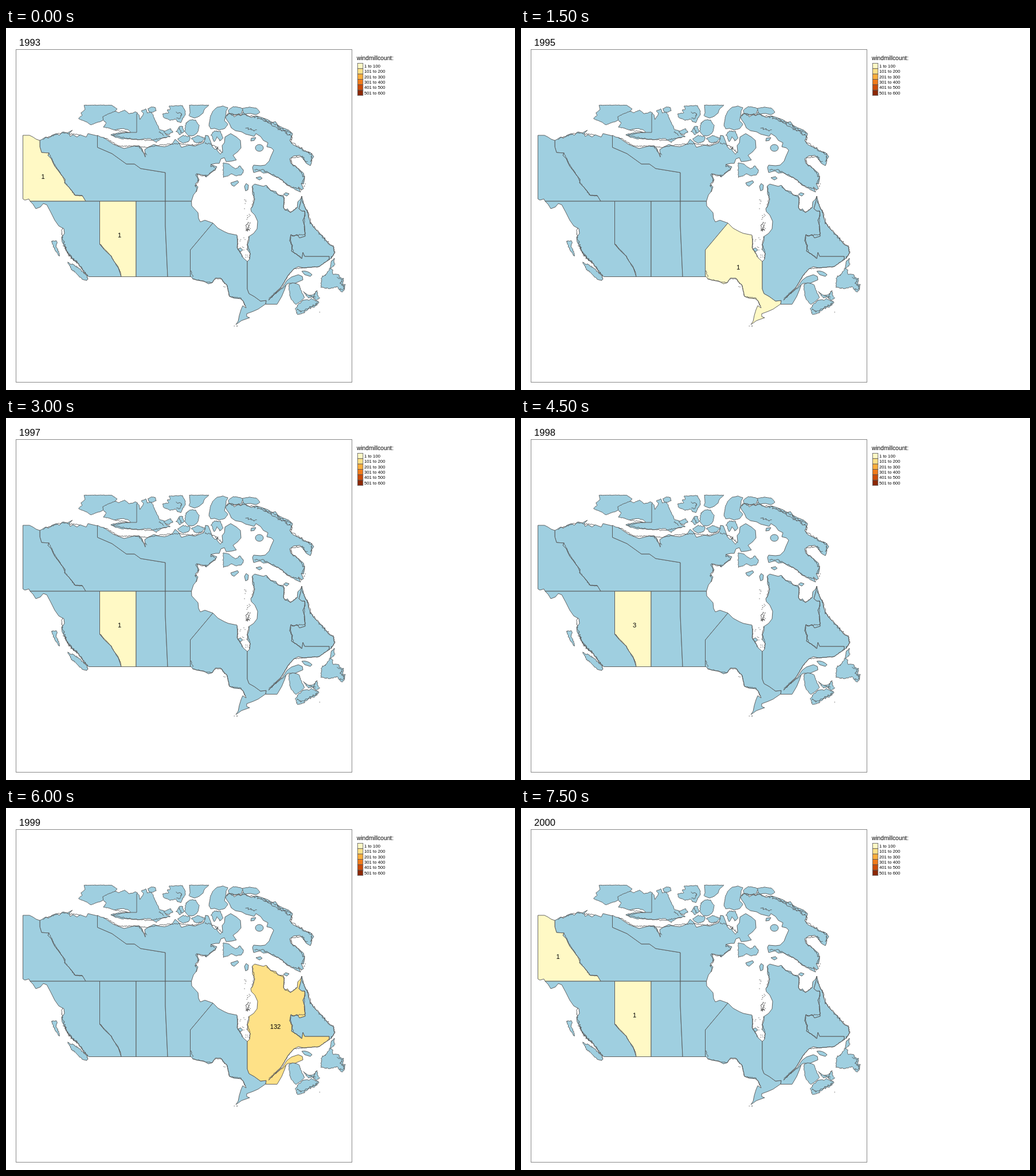
Animation of 888 by 631 pixels, one loop 8000 ms. Source, as an HTML page:

```html
<!DOCTYPE html>
<html lang="en">
<head>
<meta charset="utf-8">
<title>Windmill count by year</title>
<style>
  html, body { margin: 0; width: 100%; height: 100%; overflow: hidden; background: #fff; }
  svg { display: block; width: 888px; height: 631px; font-family: "Liberation Sans", Arial, sans-serif; }
  .land { fill: #9fcfe0; stroke: #555; stroke-width: .9; stroke-linejoin: round; }
  .coast { fill: none; stroke: #555; stroke-width: .9; }
  #labels { font-size: 11.2px; text-anchor: middle; }
</style>
</head>
<body>
<svg viewBox="0 0 888 631">
  <rect x="17.5" y="37.5" width="586" height="580" fill="none" stroke="#888"/>
  <text id="year" x="23" y="31" font-size="16.6"></text>
  <text x="612" y="55.5" font-size="10.2">windmillcount:</text>
  <g id="legend" font-size="7.75"></g>

  <g class="land">
    <!-- Mainland -->
    <path d="M59 196L63 194 69 190 74 192 80 187 88 184 93 187 99 181 107 183 116 178 110 184 112 189 117 186 124 190 129 186 140 190 143 184 159.5 188V208L185 219 210 237 224 237 235 245 278 252V302H139L133 292 121 292 116 285 109 277 102 270 103 264 97 257 92 250 85 241 82 235 79 228 73 222 75 218 62 217 59 207Z"/>
    <path d="M159.5 187L165 190 171 191 179 197 188 203 198 207 206 210 214 208 222 206 232 205 237 210 243 225 242 212 248 208 258 203 267 206 277 207 283 205 290 202 295 194 301 199 306 208 313 206 320 204 329 206 337 203 345 200 347 194 348 187 353 188 357 198 360 207 365 212 370 207 368 213 374 220 378 215 377 205 381 200 382 190 392 184 402 190 409 196 410 209 404 216 396 222 402 230 394 232 384 233 381 226 375 228 372 236 366 236 357 238 368 242 364 248 358 252 349 260 346 257 333 254 335 261 337 265 330 272 335 277 331 286 327 291 323.500 302H278V252L235 245 224 237 210 237 185 219 159.500 208Z"/>
    <path id="northwest" d="M29.500 187L41 187 47 190 53 194 59 196V207L62 217 75 218 73 222 79 228 82 235 85 241 92 250 97 257 103 264 102 270 109 277 116 285 121 292 133 292 139 302H42L40 298 33 300 29.500 298Z"/>
    <path d="M42 302H163.500V377L172 387 183 397 195 415 201 433.500H145L142 432 133 421 125 409 117 404 108 393 104 384 98 373 97 365 102 358 101 350 92 345 85 335 78 321 71 308 65 306 60 312 52 315 47 307Z"/>
    <path id="foothills" d="M163.500 302H227V433.500H201L200 427 195 415 188 406 183 397 172 387 166 378 163.500 377Z"/>
    <path d="M227 302H278V345L282 433.500H227Z"/>
    <path d="M278 302H323.500L324 310 335 322 336 332 339 338 347 335 361 340 321.500 387V433.500H282L278 345Z"/>
    <path id="lakes" d="M361 340L370 349 381 355 388 358 403 361 404 374 403 383 409 391 414 401 421 407V455L424 463 433 468 444 476 454 475 453 481 440 490 431 494 420 498 420 503 425 505 411 510 401 517 405 511 407 501 410 491 413 484 419 488 414 476 409 472 398 471 390 468 387 455 385 447 379 443 375 436 365 436 360 444 353 446 345 441 335 440 326 437 323 433.500H321.500V387Z"/>
    <path id="east" d="M421 407L425 403 426 393 422 388 421 378 424 370 423 364 432 358 438 350 439 337 434 326 428 320 427 315 431 309 434 298 430 289 430 275 434 272 449 276 454 274 462 283 471 285 474 291 484 292 485 300 484 313 487 318 491 315 496 322 503 317 508 313 509 303 514 298 516 293 515 301 511 315 516 319 521 319 522 327 518 335 521 345 522 363 512 366 508 360 502 363 497 360 495 371 500 379 498 389 505 393 516 402 518 391 521 398H564V404L556 409 546 416 533 417 519 418 510 416 502 420 492 431 482 449 470 462 458 474 473 460 483 451 490 440 498 434 510 430 517 433 518 439 504 445 493 445 489 447 486 456 481 468 473 481.500H453L454 475 444 476 433 468 424 463 421 455Z"/>
    <path d="M516 293L518 301 521 312 526 319 528 331 532 340 538 349 545 356 552 362 559 371 563 377 571 381 573 391 570 398 564 404V398H521L518 391 516 402 505 393 498 389 500 379 495 371 497 360 502 363 508 360 512 366 522 363 521 345 518 335 522 327 521 319 516 319 511 315 515 301Z"/>
    <path data-rough=".5" d="M494 447L500 444 511 447 513 453 517 463 521 470 514 476 506 482 500 476 496 470 494 456Z"/>

    <!-- Atlantic islands -->
    <path data-rough="1.1" d="M505 490L512 479 519 474 526 474 534 472 538 475 547 478 536 487 527 490 517 498 509 500Z"/>
    <path data-rough=".9" d="M536 470L540 459 543 458 543 466 547 471 541 475Z"/>
    <path data-rough=".6" d="M519 460L527 466 536 465 539 462 536 469 527 470Z"/>
    <path data-rough="1" d="M573 402L567 409 564 422 558 431 551 433 550 444 549 452 560 454 570 453 578 451 581 456 587 461 591 456 592 446 586 448 589 437 581 434 581 430 570 429 570 421 566 420 573 412Z"/>
    <path d="M516 424Q526 422 534 430L531 433 521 430Z"/>

    <!-- Pacific islands -->
    <path data-rough="1.1" d="M108 409L118 413 130 421 139 430 143 437 141 441 132 437 122 427 113 419Z"/>
    <path data-rough=".8" d="M80 372L88 370 90 374 87 380 91 387 94 398 87 390 82 379Z"/>

    <!-- Arctic islands -->
    <path data-rough=".3" d="M136 134.500H184L194 141 186 150 176 154 168 162 158 165 148 169 141 164 126 158 133 152 131 148 138 142Z"/>
    <path data-rough=".6" d="M169 155L177 150 190 145 196 148 206 143 214 149 222 148 226 146 232 151 234 159 240 150 236 144 244 141 247 148 252 146 256 151 259 158 262 165 268 177 277 180 279 186 287 189 272 192 262 199 252 193 240 193 234 195 214 193 202 193 190 190 183 186 196 183 218 182 214 178 205 175 189 178 178 174 170 173 175 165 169 160Z"/>
    <path data-rough=".5" d="M248 141L253 138 260 138 262 144 255 147 249 146Z"/>
    <path data-rough=".6" d="M284 136L308 135 309 139 313 144 313 150 308 158 305 165 299 163 296 159 287 161 275 156 274 149 284 148 281 143 287 142Z"/>
    <path data-rough=".3" d="M320 134.500H354L346 142 344 148 337 154 329 157 319 153 321 148Z"/>
    <path data-rough=".6" d="M314 166L321 160 331 161 337 170 335 181 329 187 318 188 312 181Z"/>
    <path data-rough=".8" d="M300 194L309 187 322 190 318 199 307 201Z"/>
    <path data-rough=".8" d="M275 181L286 175 291 181 283 186Z"/>
    <path data-rough=".8" d="M297 180L303 171 308 172 311 181 303 186Z"/>
    <path data-rough=".9" d="M324 193L335 187 348 193 341 199 331 200Z"/>
    <path data-rough=".9" d="M358 186L364 179 375 181 379 191 374 197 368 190 363 198Z"/>
    <path data-rough=".3" d="M357 153L360 146 368 138 378 136 387 139 384 145 383 154 381 161 387 168 382 175 372 178 364 175 357 176 354 169Z"/>
    <path data-rough=".4" d="M388 143L396 137 406 138 414 141 410 150 400 151 389 149Z"/>
    <path data-rough=".4" d="M412 140L425 138 438 140 443 147 437 151 424 149 415 150Z"/>
    <path d="M383 156L386 150 395 149 398 155 405 151 410 153 413 147 420 152 428 156 436 153 446 156 457 160 465 165 470 163 475 170 483 174 493 178 500 184 498 191 495 196 500 203 508 207 516 210 522 215 531 217 537 224 533 230 533 235 531 240 524 236 519 229 513 222 502 223 495 228 497 236 503 240 511 246 519 253 521 262 519 272 515 271 519 280 516 282 510 277 514 286 505 282 497 276 488 272 482 265 474 260 467 258 457 252 449 253 443 249 432 252 430 243 432 239 444 240 452 239 459 232 462 224 467 213 463 209 455 207 457 200 449 196 444 189 436 184 433 189 426 187 418 185 411 181 400 179 393 174 390 167 385 160Z"/>
    <ellipse cx="442" cy="209" rx="7" ry="6"/>
    <path d="M428 192l8-1-3 5-6 1z"/>
    <path data-rough=".6" d="M379 235L383 236 389 237 393 241 400 246 408 240 415 249 411 256 402 258 393 254 387 258 379 260 379 248Z"/>
    <path d="M392 270L404 266 406 269 398 276 394 274Z"/>
    <path d="M416 276l3-5 4 3-1 8-4 2z"/>
    <path d="M404 386l5-3 4 4-4 3z"/>
    <path d="M436 261l8-2 3 3-5 3z"/>
    <path d="M484 290l4-3 6 2-4 4z"/>
  </g>

  <g class="coast">
    <path d="M228 149V182H209"/>
    <path data-rough="1.800" d="M98 350V364L104 380 108 393 117 404 127 410 133 421 143 432"/>
    <path data-rough="2" d="M101 378L107 392 116 402 125 410"/>
    <path data-rough="1.200" d="M64 194L80 188 99 182 112 185 129 187"/>
    <path data-rough="1.100" d="M171 191L198 206 222 206 248 208 267 204 300 202 330 204 347 196"/>
    <path data-rough="2" d="M233 206L240 217 245 222"/>
    <path data-rough="1" d="M189 178L212 181 185 187 216 193 250 196 282 190"/>
    <path data-rough="1.600" d="M347 200L358 203 371 211 378 218"/>
    <path data-rough="1.500" d="M357 240L366 245 350 258 332 255 335 267 330 275 334 286"/>
    <path data-rough="2" d="M386 151L413 151 436 155 465 166 484 176 499 186"/>
    <path data-rough="2" d="M419 174L437 179 M447 160L480 178"/>
    <path data-rough="2.200" d="M472 171L498 188 497 197 513 209 533 219 533 235"/>
    <path data-rough="1.800" d="M526 235L516 224 499 226 498 237 513 248 521 261 516 271"/>
    <path data-rough="1.400" d="M516 282L495 276 474 260 449 248 433 246"/>
    <path data-rough="1" d="M430 276L433 296 428 315 M454 275L462 283 474 290 485 296 485 314 496 321 509 312"/>
    <path data-rough="1.600" d="M517 300L522 314 528 322 531 339 544 355 558 370"/>
    <path data-rough="1.200" d="M558 370L572 382 573 392 566 402"/>
    <path data-rough=".9" d="M521 319L521 335 520 345 522 360 508 361 496 363 498 380 502 391 515 400"/>
    <path data-rough=".7" d="M564 403L546 416 519 418 502 420 491 434 480 452 458 472"/>
    <path data-rough="1.500" d="M578 435L588 439 582 444 590 449 587 457 580 453"/>
    <path data-rough="1.500" d="M508 490L515 494 535 485 545 478 M530 467L540 470"/>
    <path data-rough="1.500" d="M322 423L326 432 324 436"/>
    <path data-rough=".8" d="M326 437L345 442 360 444 365 437 375 437 386 450 390 468 410 471 418 485"/>
    <path data-rough=".8" d="M424 364L421 377 426 393 424 404 M404 363L404 384 413 400"/>
    <path data-rough="2" d="M421 339L419 347 424 351 420 353 425 342"/>
    <path data-rough=".7" d="M75 218L85 238 98 258 104 270 120 291 134 293"/>
    <path data-rough=".6" d="M164 377L183 397 200 426"/>
    <path data-rough="1.300" d="M297 147L307 150 303 158 296 157 M302 174L306 183 M266 181L276 187"/>
    <path data-rough=".7" d="M458 474L473 461 489 448"/>
  </g>
  <path id="islets" fill="#555"/>
  <g id="labels"></g>
</svg>
<script>
const classColors = ["#fff9c5", "#fee187", "#feae3b", "#f17b1b", "#cc4c08", "#8c2804"];
const labelSpots = { northwest: [64.5, 263], foothills: [198, 364.5], lakes: [379, 421], east: [470, 385] };
const scenes = [
  [1993, { northwest: 1, foothills: 1 }],
  [1995, { lakes: 1 }],
  [1997, { foothills: 1 }],
  [1998, { foothills: 3 }],
  [1999, { east: 132 }],
  [2000, { northwest: 1, foothills: 1 }]
];
const sceneTime = 1500, loopTime = 8000;
const byId = id => document.getElementById(id);

let seed = 7;
const random = () => (seed = seed * 16807 % 2147483647) / 2147483647;
const jitter = size => (random() * 2 - 1) * size;

// Resample one subpath and displace its points to make a ragged shore.
function ragged(d, size) {
  const probe = document.createElementNS("http://www.w3.org/2000/svg", "path");
  probe.setAttribute("d", d);
  const length = probe.getTotalLength(), points = [];
  for (let s = 0; s < length; s += 1.6) {
    const p = probe.getPointAtLength(s);
    points.push((p.x + jitter(size)).toFixed(1) + " " + (p.y + jitter(size)).toFixed(1));
  }
  return "M" + points.join("L") + (/Z$/.test(d) ? "Z" : "");
}

for (const path of document.querySelectorAll("[data-rough]")) {
  const parts = path.getAttribute("d").match(/M[^M]+/g);
  path.setAttribute("d", parts.map(d => ragged(d.trim(), +path.dataset.rough)).join(""));
}

// Clusters of specks: center, spread and number.
const clusters = [[422, 346, 4, 9, 16], [417, 308, 2, 10, 5], [423, 328, 4, 5, 7], [412, 377, 5, 12, 7],
  [420, 391, 3, 8, 6], [380, 449, 2, 5, 3], [546, 494, 1, 1, 1], [400, 519, 3, 1, 3], [520, 270, 2, 12, 6]];
byId("islets").setAttribute("d", clusters.map(([x, y, dx, dy, count]) =>
  Array.from({ length: count }, () =>
    `M${x + jitter(dx)} ${y + jitter(dy)}h1.3v1h-1.3z`).join("")).join(""));

byId("legend").innerHTML = classColors.map((color, i) => {
  const y = 61.5 + i * 9.35;
  return `<rect x="613.5" y="${y}" width="9.3" height="9.35" fill="${color}" stroke="#555" stroke-width=".8"/>
    <text x="625" y="${y + 7.4}">${i * 100 + 1} to ${(i + 1) * 100}</text>`;
}).join("");

let shown = -1;
function draw(now) {
  const index = Math.floor(now % loopTime / sceneTime);
  if (index !== shown) {
    shown = index;
    const [year, counts] = scenes[index];
    byId("year").textContent = year;
    for (const id in labelSpots)
      byId(id).style.fill = counts[id] ? classColors[Math.floor((counts[id] - 1) / 100)] : "";
    byId("labels").innerHTML = Object.entries(counts).map(([id, count]) =>
      `<text x="${labelSpots[id][0]}" y="${labelSpots[id][1]}">${count}</text>`).join("");
  }
  requestAnimationFrame(draw);
}
const start = performance.now();
draw(0);
function tick() { draw(performance.now() - start); }
draw = (paint => () => {
  const elapsed = performance.now() - start;
  paint(elapsed);
})(draw);
</script>
</body>
</html>
```
